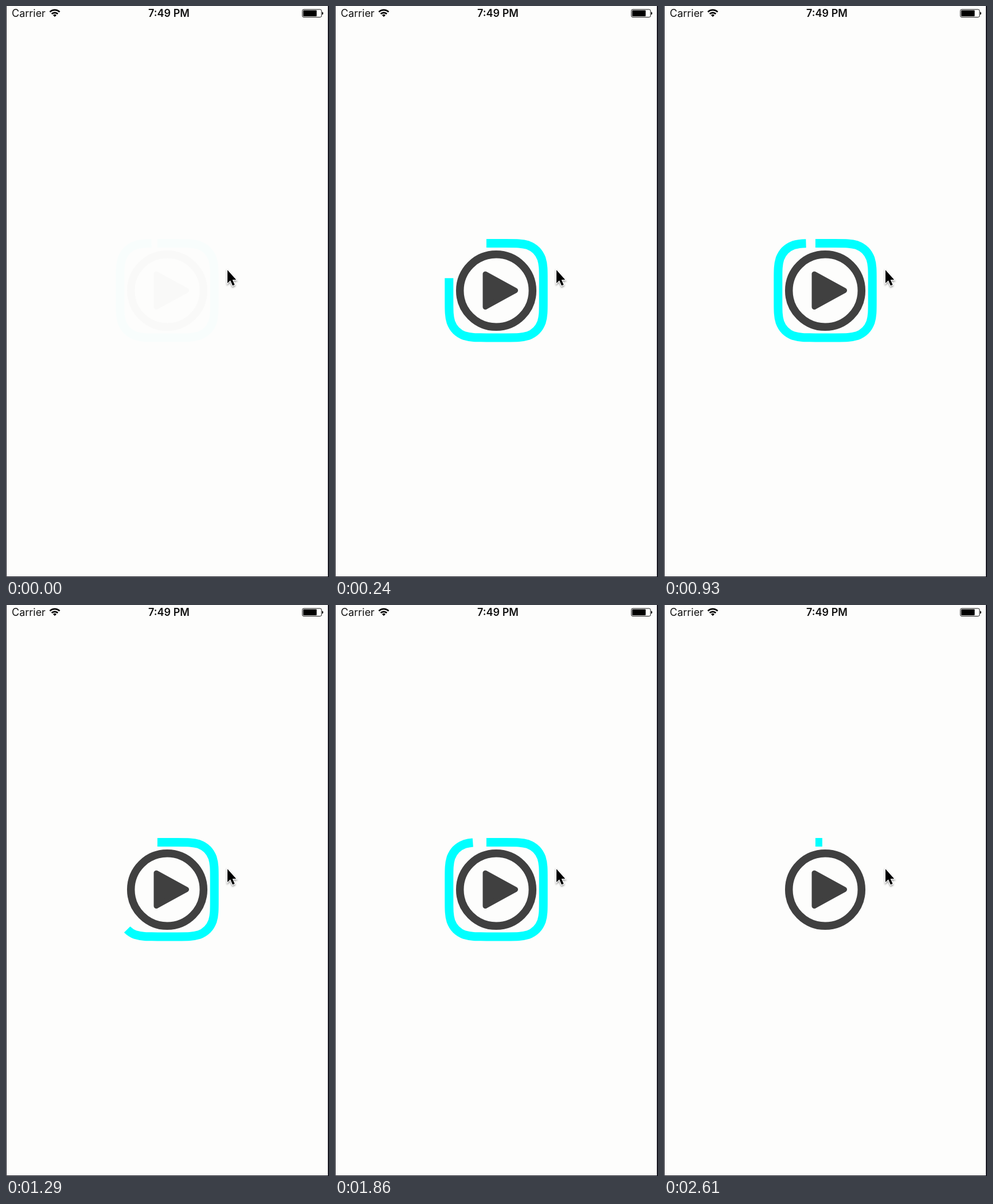
An HTML page for the animation above (2640 ms loop, 563 by 995 pixels).

```html
<!DOCTYPE html>
<html lang="en">
<head>
<meta charset="utf-8">
<title>Play button with outline timer</title>
<style>
  html, body { margin: 0; width: 100%; height: 100%; overflow: hidden; background: #fdfdfc; }
  svg { display: block; width: 563px; height: 995px; }
  text { font: 18px Inter, Roboto, sans-serif; fill: #111; }
</style>
</head>
<body>
<svg viewBox="0 0 563 995">
  <path d="M.5 0V994.5H562V0" fill="none" stroke="#161620"/>
  <path d="M562 0V995" stroke="#161620" stroke-width="2"/>

  <text x="10" y="19">Carrier</text>
  <g fill="none" stroke="#000" stroke-width="2.7">
    <path d="M76.5 10.4A12 12 0 0 1 93.5 10.4"/>
    <path d="M79.7 13.8A7.5 7.5 0 0 1 90.3 13.8"/>
    <path d="M85 19L82 15.9A4.3 4.3 0 0 1 88 15.9Z" fill="#000" stroke="none"/>
  </g>
  <text x="284" y="19" text-anchor="middle" font-weight="600" style="font-weight:600">7:49 PM</text>
  <rect x="516.5" y="6" width="33.5" height="13.5" rx="2.5" fill="none" stroke="#111"/>
  <rect x="518" y="7.5" width="23.5" height="10.5" rx="1"/>
  <path d="M551 10.3Q553 10.5 553 12.8T551 15.3Z"/>

  <g id="player">
    <path id="outline" pathLength="1" fill="none" stroke="#0ff" stroke-width="15" transform="translate(281 495.7)"/>
    <circle cx="281" cy="496" r="63.3" fill="none" stroke="#404040" stroke-width="13.5"/>
    <path d="M262 467V524.5L314.5 495.7Z" fill="#404040" stroke="#404040" stroke-width="9" stroke-linejoin="round"/>
  </g>

  <path d="M386 460V483L391 478.3L395 487.3L398.6 485.7L394.7 477H401.2Z" stroke="#fff" stroke-width="2.4"
    paint-order="stroke" style="filter:drop-shadow(0 2px 1.5px #0006)"/>
</svg>
<script>
const LOOP = 2640, STEP = 30, CYCLE = 904, LEAD = 91, FADE = 210;
const player = document.getElementById('player');
const outline = document.getElementById('outline');

// Square with continuous corners, clockwise from the top left.
function squirclePath(half, radius) {
  const corner = [
    [1.5287, 0], [1.0885, 0], [.8684, 0], [.6315, .0749],
    [.3728, .1691], [.1691, .3728], [.0749, .6315],
    [0, .8684], [0, 1.0885], [0, 1.5287]
  ];
  let d = `M${-half + 1.5287 * radius} ${-half}`;
  for (let turn = 0; turn < 4; turn++) {
    const points = corner.map(([a, b]) => {
      let x = half - a * radius, y = b * radius - half;
      for (let i = 0; i < turn; i++) [x, y] = [-y, x];
      return `${x} ${y}`;
    });
    d += `L${points[0]}C${points.slice(1).join(' ')}`;
  }
  return d;
}

// cubic-bezier(.42, 0, 1, 1)
function easeIn(x) {
  let low = 0, high = 1, s;
  for (let i = 0; i < 24; i++) {
    s = (low + high) / 2;
    const curveX = 1.26 * s * (1 - s) ** 2 + 3 * s * s * (1 - s) + s ** 3;
    if (curveX < x) low = s; else high = s;
  }
  return s * s * (3 - 2 * s);
}

function draw(now) {
  const t = Math.floor(now % LOOP / STEP) * STEP;
  const shown = 1 - easeIn((t + LEAD) % CYCLE / CYCLE);
  outline.setAttribute('stroke-dasharray', `${shown} 2`);
  player.setAttribute('opacity', Math.min(1, .015 + t / FADE));
}

outline.setAttribute('d', squirclePath(82.2, 42.6));
const start = performance.now();
function tick() {
  draw(performance.now() - start);
  requestAnimationFrame(tick);
}
tick();
</script>
</body>
</html>
```
